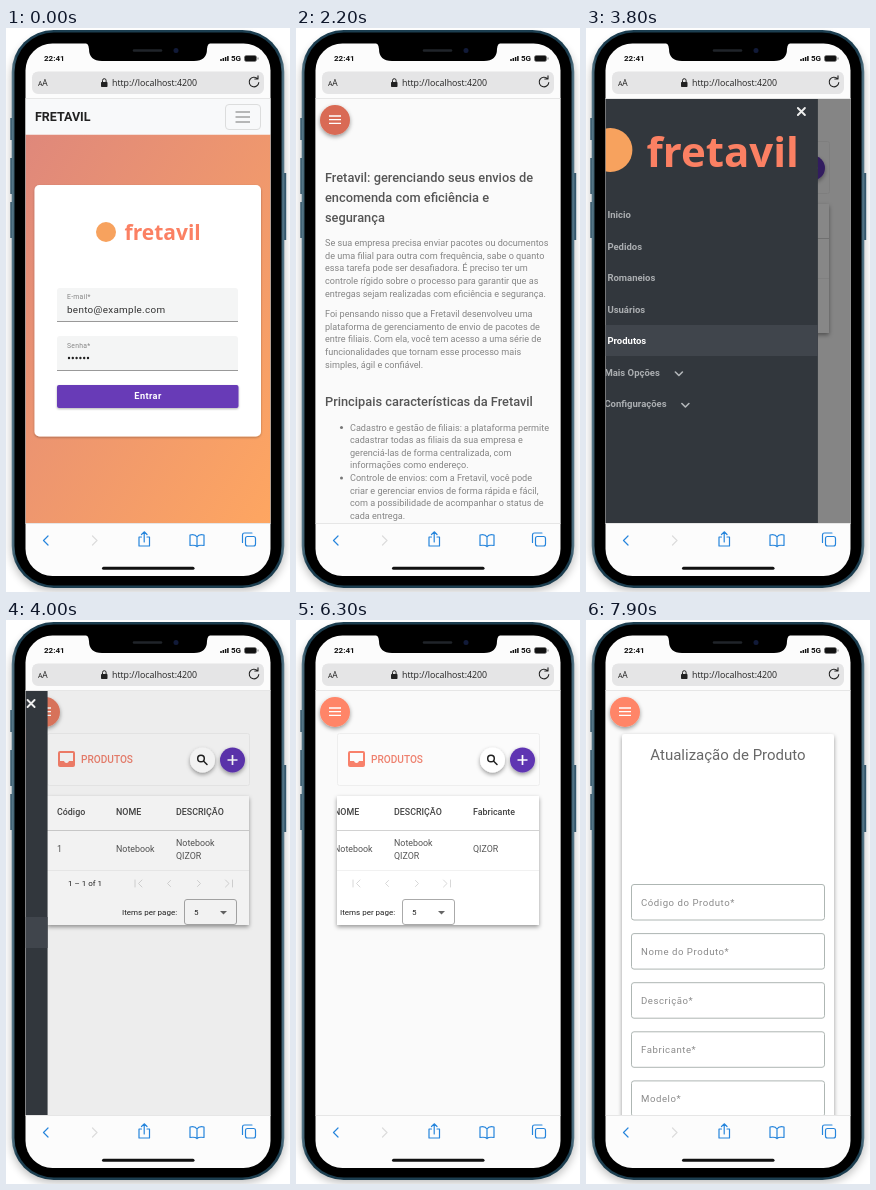
These frames come from a looping animation (284x564 px, 8000 ms). An HTML page:

```html
<!DOCTYPE html>
<html lang="pt">
<head>
<meta charset="utf-8">
<title>Fretavil</title>
<style>
html, body { margin: 0; width: 100%; height: 100%; overflow: hidden; background: #fff; }
svg { display: block; width: 100%; height: 100%; font-family: Roboto, sans-serif; }
.line { fill: none; stroke-linecap: round; stroke-linejoin: round; }
.word { font: 700 21px "Open Sans", sans-serif; fill: #fb8063; }
.h { font-size: 12.8px; font-weight: 500; fill: #555; }
.p { font-size: 9.1px; fill: #858585; }
.nav { font-size: 9.5px; font-weight: 700; fill: #abaeb1; }
.th { font-size: 8.9px; font-weight: 500; fill: #444; }
.td { font-size: 8.9px; fill: #555; }
.small { font-size: 8px; fill: #222; }
.label { font-size: 9.6px; letter-spacing: .55px; fill: #8b8b8b; }
.hint { font-size: 6.8px; letter-spacing: .3px; fill: #858585; }
</style>
</head>
<body>
<svg viewBox="0 0 284 564">
  <defs>
    <linearGradient id="sunset" x1="0" y1="0" x2="1" y2="1">
      <stop offset="0" stop-color="#df887b"/><stop offset="1" stop-color="#fea661"/>
    </linearGradient>
    <linearGradient id="rim">
      <stop offset="0" stop-color="#5c7c8c"/><stop offset=".02" stop-color="#1c3e50"/>
      <stop offset=".98" stop-color="#1c3e50"/><stop offset="1" stop-color="#5c7c8c"/>
    </linearGradient>
    <filter id="lift" x="-30%" y="-30%" width="160%" height="170%">
      <feDropShadow dx="0" dy="2" stdDeviation="2" flood-opacity=".4"/>
    </filter>
    <filter id="soft" x="-30%" y="-30%" width="160%" height="170%">
      <feDropShadow dx="0" dy="1" stdDeviation="1" flood-opacity=".3"/>
    </filter>
    <filter id="blur"><feGaussianBlur stdDeviation="4"/></filter>
    <clipPath id="view"><rect x="19.500" y="71" width="245" height="424"/></clipPath>
    <clipPath id="tableBox"><rect x="41" y="176" width="202" height="129"/></clipPath>
    <clipPath id="screen"><rect x="19.500" y="15.500" width="245" height="532.500" rx="27"/></clipPath>
  </defs>

  <!-- phone body -->
  <rect x="5" y="8" width="274" height="555" rx="42" opacity=".25" filter="url(#blur)"/>
  <path d="M5.500 90V112M5.500 130V166M5.500 174V210M279 145V212" stroke="#34566a" stroke-width="2.400"/>
  <rect x="5.700" y="2" width="272.600" height="558" rx="42" fill="url(#rim)"/>
  <rect x="8.500" y="4.500" width="267" height="553" rx="39.500"/>

  <g clip-path="url(#screen)">
    <rect x="19" y="15" width="246" height="533" fill="#fcfcfc"/>

    <g clip-path="url(#view)">
      <rect x="19" y="71" width="246" height="424" fill="#fafafa"/>

      <g id="login">
        <rect x="19" y="106.500" width="246" height="389" fill="url(#sunset)"/>
        <rect x="19" y="71" width="246" height="35.500" fill="#f8f9fa"/>
        <text x="29" y="93" font-size="12.500" font-weight="700" fill="#222">FRETAVIL</text>
        <rect x="219.500" y="76.500" width="35" height="25" rx="3.500" fill="none" stroke="#dcdddd"/>
        <path d="M229.500 84H244M229.500 89H244M229.500 94H244" stroke="#777" stroke-width="1.200"/>
        <rect x="28.500" y="157" width="226.500" height="251.500" rx="5" fill="#fff" filter="url(#soft)"/>
        <circle cx="100" cy="204" r="10" fill="#f7a25e"/>
        <text class="word" x="118.500" y="212">fretavil</text>
        <path d="M51 293V263a3 3 0 0 1 3-3H229a3 3 0 0 1 3 3V293ZM51 342V311a3 3 0 0 1 3-3H229a3 3 0 0 1 3 3V342Z" fill="#f4f5f5"/>
        <path d="M51 293.500H232M51 342.500H232" stroke="#999"/>
        <text class="hint" x="61" y="271">E-mail*</text>
        <text x="61" y="285" font-size="9.900" letter-spacing=".3" fill="#333">bento@example.com</text>
        <text class="hint" x="61" y="320">Senha*</text>
        <path class="line" d="M63 330H83" stroke="#222" stroke-width="2.400" stroke-dasharray="0 3.800"/>
        <rect x="51" y="357" width="181.500" height="23" rx="2" fill="#673ab7" filter="url(#soft)"/>
        <text x="142" y="371.300" text-anchor="middle" font-size="9.200" font-weight="700" letter-spacing=".4" fill="#fff">Entrar</text>
      </g>

      <g id="home"></g>

      <g id="products">
        <rect x="41.500" y="113.500" width="202" height="52" rx="2" fill="#fbfbfb" stroke="#eee"/>
        <path d="M54 131H67a2 2 0 0 1 2 2V145a2 2 0 0 1-2 2H54a2 2 0 0 1-2-2V133a2 2 0 0 1 2-2ZM54 133V141H58a2.600 2.600 0 0 0 5 0H67V133Z" fill="#f8816b" fill-rule="evenodd"/>
        <text x="75" y="142.500" font-size="10.100" font-weight="500" fill="#ee806e">PRODUTOS</text>
        <circle cx="196.500" cy="140" r="12.500" fill="#fff" filter="url(#lift)"/>
        <g class="line" stroke="#222" stroke-width="1.500"><circle cx="195" cy="138.500" r="3.300"/><path d="M197.700 141.200L201 144.500"/></g>
        <circle cx="226.500" cy="140" r="12.500" fill="#5f35b2" filter="url(#lift)"/>
        <path d="M221.500 140H231.500M226.500 135V145" stroke="#fff" stroke-width="1.700"/>
        <rect x="41" y="176" width="202" height="129" fill="#fff" filter="url(#lift)"/>
        <g clip-path="url(#tableBox)">
          <path d="M41 210.500H243" stroke="#d2d2d2"/>
          <path d="M41 250.500H243" stroke="#f1f1f1"/>
          <g id="table"></g>
        </g>
      </g>

      <g id="form">
        <rect x="36" y="114" width="212" height="400" rx="3" fill="#fff" filter="url(#lift)"/>
        <text x="142" y="140" text-anchor="middle" font-size="15" fill="#686868">Atualização de Produto</text>
      </g>

      <g id="fab">
        <circle id="fabDisc" cx="39" cy="92" r="15" filter="url(#lift)"/>
        <path d="M33 88H45M33 91.700H45M33 95.400H45" stroke="#fff" stroke-width="1.300"/>
      </g>

      <rect id="shade" x="19" y="71" width="246" height="424"/>
      <g id="menu">
        <rect x="19" y="71" width="244.500" height="424" fill="#32373d"/>
        <path class="line" d="M243.500 80L250.500 87M250.500 80L243.500 87" stroke="#eee" stroke-width="1.900"/>
        <circle cx="56" cy="122" r="22" fill="#f7a25e"/>
        <text class="word" x="92" y="139" style="font-size:42px">fretavil</text>
        <rect id="hover" x="19" y="297" width="244.500" height="31" fill="#40454c"/>
        <g fill="#b4b7ba" fill-rule="evenodd">
          <path d="M37 181L44 187.500H42V193H38.500V189H35.500V193H32V187.500H30Z"/>
          <path d="M31 214H34.500a2.500 2.500 0 0 1 5 0H43V225H31ZM33.500 217V218.200H40.500V217ZM33.500 219.500V220.700H40.500V219.500ZM33.500 222V223.200H38V222Z"/>
          <path d="M31 244.500H43V256.500H31ZM33 247V248.200H41V247ZM33 250V251.200H41V250ZM33 253V254.200H41V253Z"/>
          <circle cx="34.500" cy="280" r="2.500"/><circle cx="39.500" cy="280.500" r="2"/>
          <path d="M30 287C30 282.500 39 282.500 39 287ZM40 287C40 285.500 39.500 284.500 38.500 283.700C41 283 44 284.500 44 287Z"/>
          <path d="M31 308.500a1 1 0 0 1 1-1H42a1 1 0 0 1 1 1V318.500a1 1 0 0 1-1 1H32a1 1 0 0 1-1-1ZM33 309.500V315H35a2 2 0 0 0 4 0H41V309.500Z"/>
        </g>
        <g class="line" stroke="#b4b7ba" stroke-width="1.600">
          <path d="M32 345.500H41M36.500 341V350M121 344L124.500 347.500L128 344M127.500 375.500L131 379L134.500 375.500"/>
          <circle cx="36.500" cy="376.500" r="3.400" stroke-width="3"/>
          <circle cx="36.500" cy="376.500" r="5.500" stroke-width="2" stroke-dasharray="2.900 2.860" style="stroke-linecap:butt"/>
        </g>
      </g>
    </g>

    <!-- browser chrome -->
    <text x="38" y="33" font-size="8" font-weight="700" fill="#111">22:41</text>
    <path d="M215 33V31M217.300 33V30M219.600 33V29M221.900 33V28" stroke="#111" stroke-width="1.500"/>
    <text x="225" y="33" font-size="8" font-weight="700" fill="#111">5G</text>
    <rect x="238.500" y="27.500" width="12" height="6" rx="1.800" fill="#111" stroke="#777" stroke-width=".6"/>
    <path d="M252 29.500V31.500" stroke="#777"/>
    <rect x="26" y="43.500" width="232" height="22.500" rx="6" fill="#e5e5e6"/>
    <g fill="#222" font-family="Open Sans, sans-serif">
      <text x="32" y="58" font-size="7">A</text><text x="36.300" y="58" font-size="8.500">A</text>
      <text x="106" y="58" font-size="8.800">http://localhost:4200</text>
    </g>
    <rect x="95" y="54" width="6.500" height="5" rx=".8" fill="#222"/>
    <path class="line" d="M96.500 54V52.500a1.800 1.800 0 0 1 3.600 0V54" stroke="#222"/>
    <path class="line" d="M251.500 50.700A4.800 4.800 0 1 0 252.800 54.500M252 47.800V51H248.800" stroke="#222" stroke-width="1.100"/>
    <path d="M19 70.500H265M19 495.500H265" stroke="#e6e6e6"/>
    <g class="line" stroke="#2685dc" stroke-width="1.200">
      <path d="M42 508L37.500 512.500L42 517"/>
      <path d="M86.500 508L91 512.500L86.500 517" stroke="#ddd"/>
      <path d="M135.500 509H133V518H143.500V509H141M138.200 514V504M135.500 506.500L138.200 503.800L141 506.500"/>
      <path d="M191 509C189.500 506.500 186 506.500 184 507V517.500C187 517 189.500 517 191 518.500C192.500 517 195 517 198 517.500V507C196 506.500 192.500 506.500 191 509V518"/>
      <rect x="239.500" y="508.500" width="10" height="9.500" rx="2"/>
      <path d="M236.500 514.500V507a2 2 0 0 1 2-2H246"/>
    </g>
    <path class="line" d="M97.500 540.300H187" stroke="#111" stroke-width="3"/>
  </g>

  <!-- notch -->
  <path d="M77 14Q83 15 83 21Q83 33 96 33H188Q201 33 201 21Q201 15 207 14Z"/>
  <path class="line" d="M128 22.500H155" stroke="#20242a" stroke-width="2.500"/>
  <circle cx="170" cy="22.500" r="2.500" fill="#111a38"/>
</svg>

<script>
const $ = id => document.getElementById(id);
const add = (id, markup) => $(id).insertAdjacentHTML("beforeend", markup);
const write = (id, cls, x, y, ...lines) => lines.forEach((s, i) =>
  add(id, `<text class="${cls}" x="${x}" y="${y + i * (cls === "h" ? 20 : 12.65)}">${s}</text>`));

write("home", "h", 29, 153.5, "Fretavil: gerenciando seus envios de", "encomenda com eficiência e", "segurança");
write("home", "p", 29, 218, "Se sua empresa precisa enviar pacotes ou documentos",
  "de uma filial para outra com frequência, sabe o quanto",
  "essa tarefa pode ser desafiadora. É preciso ter um",
  "controle rígido sobre o processo para garantir que as",
  "entregas sejam realizadas com eficiência e segurança.");
write("home", "p", 29, 289, "Foi pensando nisso que a Fretavil desenvolveu uma",
  "plataforma de gerenciamento de envio de pacotes de",
  "entre filiais. Com ela, você tem acesso a uma série de",
  "funcionalidades que tornam esse processo mais",
  "simples, ágil e confiável.");
write("home", "h", 29, 378, "Principais características da Fretavil");
write("home", "p", 54, 402.5, "Cadastro e gestão de filiais: a plataforma permite",
  "cadastrar todas as filiais da sua empresa e",
  "gerenciá-las de forma centralizada, com",
  "informações como endereço.",
  "Controle de envios: com a Fretavil, você pode",
  "criar e gerenciar envios de forma rápida e fácil,",
  "com a possibilidade de acompanhar o status de",
  "cada entrega.");
for (const y of [399.5, 450]) add("home", `<circle cx="45.5" cy="${y}" r="1.5" fill="#777"/>`);

["Inicio", "Pedidos", "Romaneios", "Usuários", "Produtos", "Mais Opções", "Configurações"].forEach((s, i) =>
  write("menu", "nav", i < 5 ? 53 : 50, 190.3 + i * 31.45, s));
const chosen = $("menu").querySelectorAll(".nav")[4];

[[51, "Código", "1"], [110, "NOME", "Notebook"], [170, "DESCRIÇÃO", ""], [249, "Fabricante", "QIZOR"]].forEach(([x, head, cell]) => {
  write("table", "th", x, 195, head);
  write("table", "td", x, 232, cell);
});
write("table", "td", 170, 226, "Notebook", "QIZOR");
write("table", "small", 62, 266, "1 – 1 of 1");
write("table", "small", 116, 295, "Items per page:");
write("table", "small", 188, 295, "5");
add("table", `<path class="line" stroke="#d8d8d8" d="M129 260V267M136 260L132.500 263.500L136 267M164.500 260.500L161.500 263.500L164.500 266.500M191.500 260.500L194.500 263.500L191.500 266.500M219.500 260L223 263.500L219.500 267M226.500 260V267"/>
  <rect x="178.500" y="279.500" width="52" height="25" rx="2.500" fill="none" stroke="#aaa"/>
  <path d="M214 291H221L217.500 294.500Z" fill="#666"/>`);

["Código do Produto*", "Nome do Produto*", "Descrição*", "Fabricante*", "Modelo*"].forEach((s, i) => {
  const y = 264.5 + i * 49.1;
  add("form", `<rect x="45.500" y="${y}" width="193" height="35.500" rx="2.500" fill="none" stroke="#aeb6b3"/>`);
  write("form", "label", 55, y + 21.5, s);
});

const ramp = (t, a, b) => Math.min(1, Math.max(0, (t - a) / (b - a)));
const easeOut = p => 1 - (1 - p) ** 3;
const smooth = p => p * p * (3 - 2 * p);
const show = (id, on) => $(id).style.display = on ? "" : "none";

function draw(t) {
  const page = t < 1300 ? "login" : t < 3600 ? "home" : t < 7500 ? "products" : "form";
  for (const id of ["login", "home", "products", "form"]) show(id, id === page);
  show("fab", page !== "login");
  $("fabDisc").setAttribute("fill", t >= 2000 && t < 3600 ? "#d96b54" : t >= 3600 && t < 5500 ? "#e2785f" : "#ff8567");

  const open = easeOut(ramp(t, 2200, 2500)) - easeOut(ramp(t, 3782, 4182));
  show("menu", open > 0);
  $("menu").setAttribute("transform", `translate(${-245 * (1 - open)})`);
  $("shade").setAttribute("opacity", .54 * open);
  show("hover", t >= 3300);
  chosen.style.fill = t >= 3300 ? "#fff" : "";

  $("table").setAttribute("transform", `translate(${-72 * smooth(ramp(t, 5400, 6300))})`);
}

const start = performance.now();
function tick() {
  draw(Math.floor((performance.now() - start) % 8000 / 100) * 100);
  requestAnimationFrame(tick);
}
tick();
</script>
</body>
</html>
```
